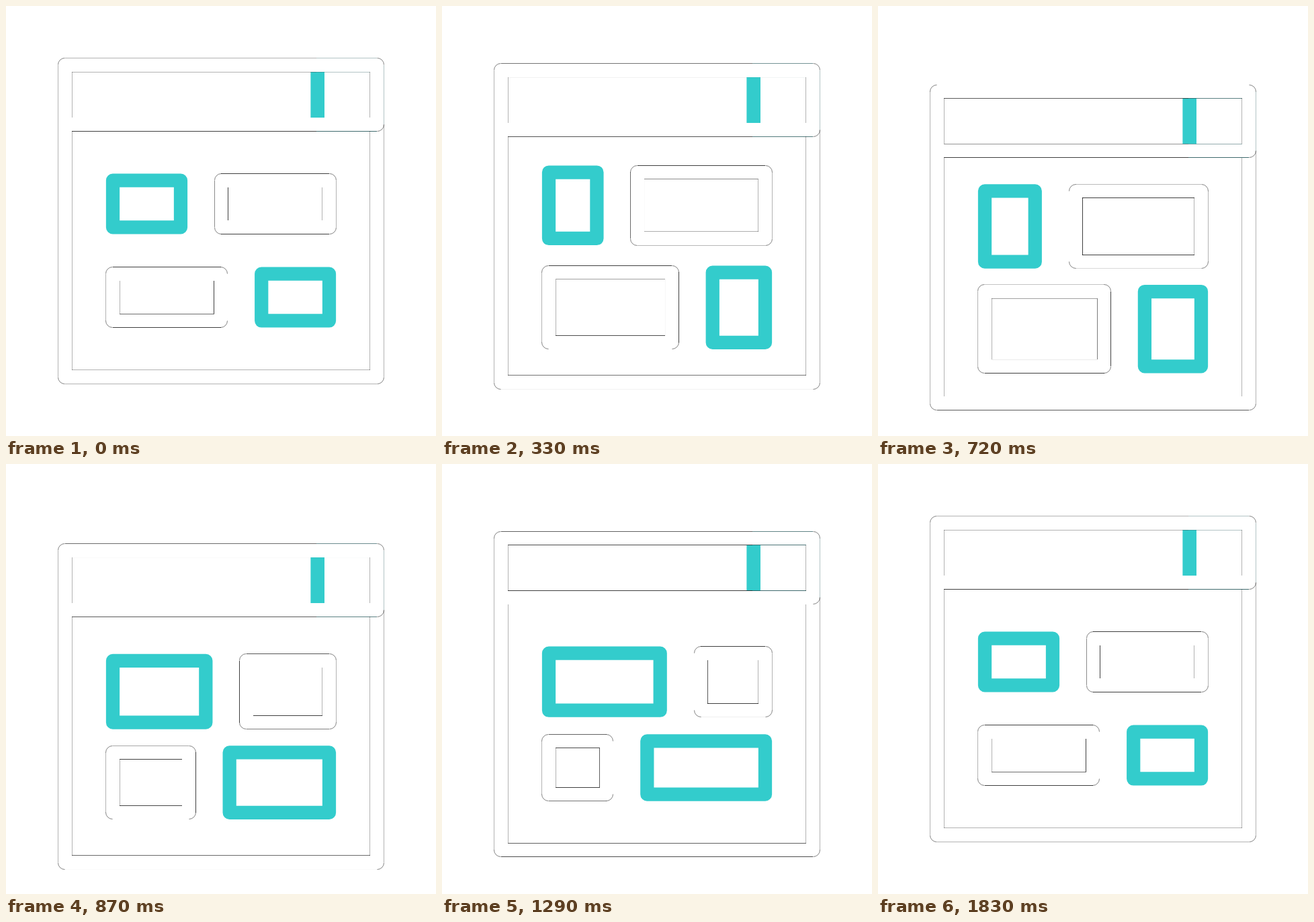
An HTML page with a canvas that plays this animation: 640x640 px, repeating every 1860 ms.

```html
<!DOCTYPE html>
<html lang="en">
<head>
<meta charset="utf-8">
<title>Page layout</title>
<style>
  html, body { margin: 0; width: 100%; height: 100%; overflow: hidden; background: #fff; }
  canvas { display: block; width: 100vmin; height: 100vmin; }
</style>
</head>
<body>
<canvas id="stage" width="640" height="640"></canvas>
<script>
const ctx = document.getElementById('stage').getContext('2d');
const LOOP = 1860, STEP = 30;
const TEAL = '#33cccc', INK = '0,0,0', TEAL_INK = '0,58,62';
const T = 20.26;   // wall thickness
const R = 10;      // corner radius
const GAP = 40.2;
const LIFT = 40.9;

// tile layout: split of row 1, split of row 2, top/bottom of row 1, top/bottom of row 2
const REST = [270.1, 329.9, 249.6, 339.4, 388.6, 478.6];
const TALL = [230.6, 360, 222.8, 351.2, 375.2, 511.3];
const WIDE = [336.8, 252.7, 249.1, 354.8, 379.6, 479.2];

function ease(t, from, to, n) {
  const x = Math.min(1, Math.max(0, (t - from) / (to - from)));
  return x < 0.5 ? 0.5 * (2 * x) ** n : 1 - 0.5 * (2 - 2 * x) ** n;
}

function layout(t) {
  const a = ease(t, 0, 548, 3), b = ease(t, 548, 1094, 3), c = ease(t, 1175, 1765, 3);
  return REST.map((v, i) => {
    v += (TALL[i] - v) * a;
    v += (WIDE[i] - v) * b;
    return v + (REST[i] - v) * c;
  });
}

// Hairline strength from how much of the pixel the white wall covers
function strength(pos, wallAfter) {
  const f = pos - Math.floor(pos), c = wallAfter ? 1 - f : f;
  return Math.max(0, Math.min(c * 2.3, (0.85 - c) * 3, 0.75));
}

function hLine(y, wallAfter, x0, x1, ink = INK) {
  ctx.fillStyle = `rgba(${ink},${strength(y, wallAfter)})`;
  const a = Math.round(x0);
  ctx.fillRect(a, Math.floor(y), Math.round(x1) - a, 1);
}

function vLine(x, wallAfter, y0, y1, ink = INK) {
  ctx.fillStyle = `rgba(${ink},${strength(x, wallAfter)})`;
  const a = Math.round(y0);
  ctx.fillRect(Math.floor(x), a, 1, Math.round(y1) - a);
}

// Quarter circle at a corner; sx, sy point from the corner inward
function corner(x, y, sx, sy) {
  const px = Math.floor(x) + 0.5, py = Math.floor(y) + 0.5;
  ctx.strokeStyle = 'rgba(0,0,0,0.55)';
  ctx.lineWidth = 0.9;
  ctx.beginPath();
  ctx.moveTo(px, py + sy * R);
  ctx.arcTo(px, py, px + sx * R, py, R);
  ctx.stroke();
}

function corners(x0, y0, x1, y1) {
  corner(x0, y0, 1, 1);
  corner(x1, y0, -1, 1);
  corner(x0, y1, 1, -1);
  corner(x1, y1, -1, -1);
}

function innerBox(x0, y0, x1, y1) {
  hLine(y0, false, x0, x1);
  hLine(y1, true, x0, x1);
  vLine(x0, false, y0, y1);
  vLine(x1, true, y0, y1);
}

function whiteTile(x0, y0, x1, y1) {
  hLine(y0, true, x0 + R, x1 - R);
  hLine(y1, false, x0 + R, x1 - R);
  vLine(x0, true, y0 + R, y1 - R);
  vLine(x1, false, y0 + R, y1 - R);
  corners(x0, y0, x1, y1);
  innerBox(x0 + T, y0 + T, x1 - T, y1 - T);
}

function tealTile(x0, y0, x1, y1) {
  ctx.fillStyle = TEAL;
  ctx.beginPath();
  ctx.roundRect(x0, y0, x1 - x0, y1 - y0, R);
  ctx.rect(x0 + T, y0 + T, x1 - x0 - 2 * T, y1 - y0 - 2 * T);
  ctx.fill('evenodd');
}

function pageFrame(dy) {
  const l = 77.87, r = 562.13, li = l + T, ri = r - T, tint = 462;
  const top = 77.87 + dy, bottom = 562.13 + dy;
  const headTop = top + T, headEnd = 166.14 + dy, bodyTop = 186.4 + dy, bodyEnd = bottom - T;

  ctx.fillStyle = TEAL;
  ctx.fillRect(453.4, headTop, 20.6, headEnd - headTop);

  hLine(top, true, l + R, tint);
  hLine(top, true, tint, r - R, TEAL_INK);
  hLine(headTop, false, li, tint);
  hLine(headTop, false, tint, ri, TEAL_INK);
  hLine(headEnd, true, li, tint);
  hLine(headEnd, true, tint, ri, TEAL_INK);
  hLine(bodyTop, false, li, tint);
  hLine(bodyTop, false, tint, r - R, TEAL_INK);
  hLine(bodyEnd, true, li, ri);
  hLine(bottom, false, l + R, r - R);

  vLine(l, true, top + R, bottom - R);
  vLine(r, false, top + R, bodyTop - R, TEAL_INK);
  vLine(r, false, bodyTop - R, bottom - R);
  for (const [a, b] of [[headTop, headEnd], [bodyTop, bodyEnd]]) {
    vLine(li, false, a, b);
    vLine(ri, true, a, b);
  }
  corners(l, top, r, bottom);
  corner(r, bodyTop, -1, -1);
}

function draw(t) {
  ctx.fillStyle = '#fff';
  ctx.fillRect(0, 0, 640, 640);
  const dy = LIFT * (ease(t, 6, 911, 2.85) - ease(t, 890, 1720, 2.85));
  const [s1, s2, ...rows] = layout(t);
  const [t1, b1, t2, b2] = rows.map(y => y + dy);
  const left = 148.87, right = 491.13;
  pageFrame(dy);
  tealTile(left, t1, s1, b1);
  whiteTile(s1 + GAP, t1, right, b1);
  whiteTile(left, t2, s2, b2);
  tealTile(s2 + GAP, t2, right, b2);
}

const start = performance.now();
function tick() {
  const t = (performance.now() - start) % LOOP;
  draw(Math.floor(t / STEP) * STEP);
  requestAnimationFrame(tick);
}
tick();
</script>
</body>
</html>
```
